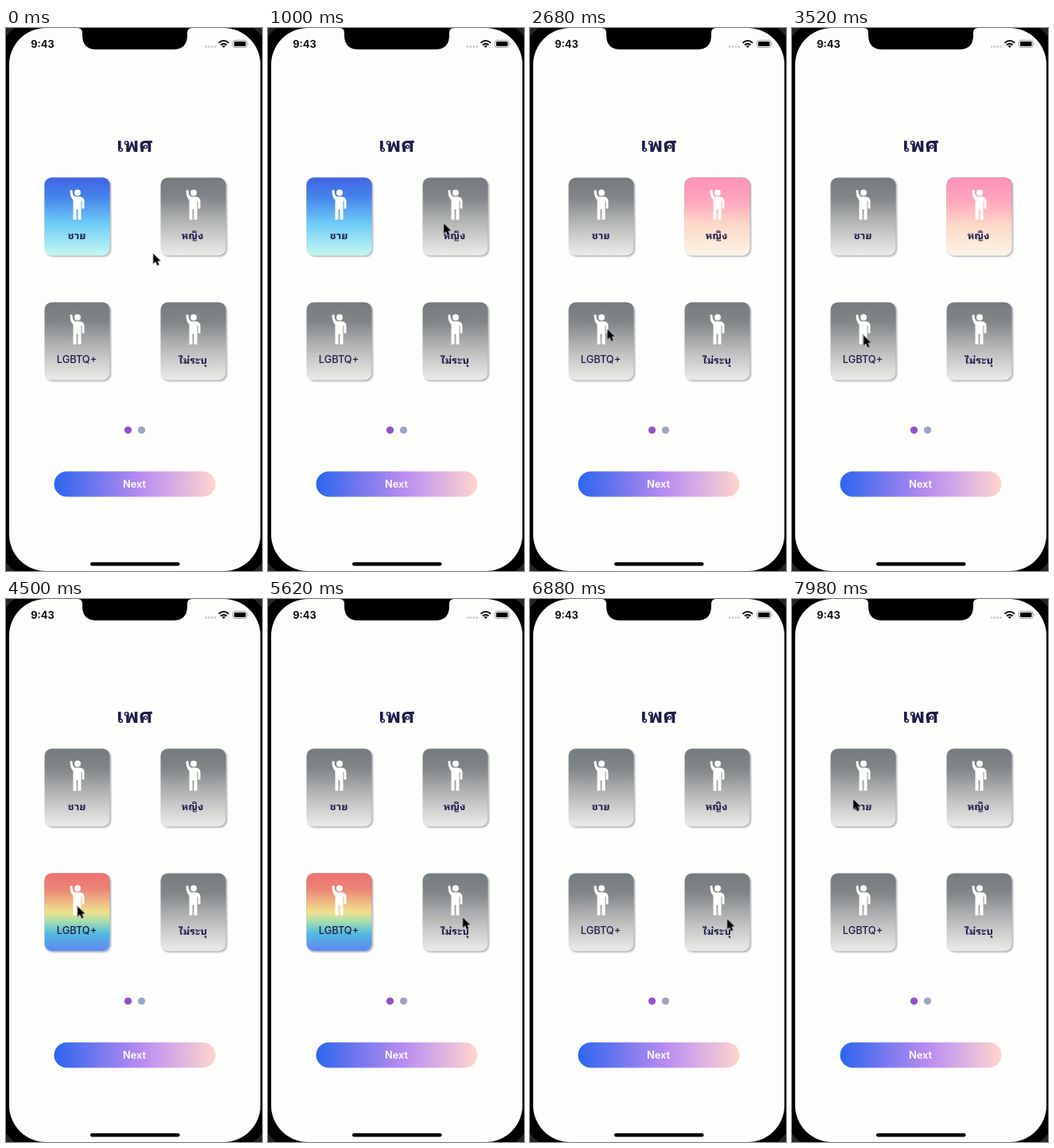
These frames come from a looping animation (322 px wide and 684 px high, 8 s). An HTML page:

```html
<!DOCTYPE html>
<html lang="th">
<head>
<meta charset="utf-8">
<title>เพศ</title>
<style>
html, body { margin: 0; width: 100%; height: 100%; overflow: hidden; background: #262626; }
svg { display: block; width: 322px; height: 684px; }
text {
  font: 500 12.8px Inter, "Noto Sans Thai Looped", "Noto Looped Thai", "Noto Sans Thai", "Noto Sans", sans-serif;
  fill: #201d4c; text-anchor: middle;
}
.title { font-size: 25px; font-weight: 600; }
.bold { font-weight: 600; }
.clock { font-weight: 700; fill: #111; }
.fill { opacity: 0; animation: 8s step-end infinite; }
.male { animation-name: male; }
.female { animation-name: female; }
.rainbow { animation-name: rainbow; }
.pointer { animation: move 8s ease-in-out infinite; }
@keyframes male { 0% { opacity: 1; } 13% { opacity: 0; } }
@keyframes female { 0% { opacity: 0; } 13% { opacity: 1; } 48% { opacity: 0; } }
@keyframes rainbow { 0% { opacity: 0; } 48% { opacity: 1; } 77% { opacity: 0; } }
@keyframes move {
  0% { transform: translate(185px, 284px); animation-timing-function: ease-out; }
  8%, 26% { transform: translate(221px, 246px); }
  35%, 60% { transform: translate(90px, 387px); }
  68.5%, 71% { transform: translate(245px, 401px); }
  74%, 88% { transform: translate(248px, 403px); }
  97%, 100% { transform: translate(77px, 252px); }
}
</style>
</head>
<body>
<svg viewBox="0 0 322 684">
  <defs>
    <linearGradient id="grey" x2="0" y2="1">
      <stop stop-color="#757b7e"/><stop offset=".25" stop-color="#808588"/>
      <stop offset=".5" stop-color="#a9abac"/><stop offset=".72" stop-color="#c9c9c9"/>
      <stop offset="1" stop-color="#ebebe8"/>
    </linearGradient>
    <linearGradient id="blue" x2="0" y2="1">
      <stop stop-color="#4464e4"/><stop offset=".25" stop-color="#4585ea"/>
      <stop offset=".6" stop-color="#70cdf8"/><stop offset="1" stop-color="#c6f8f0"/>
    </linearGradient>
    <linearGradient id="pink" x2="0" y2="1">
      <stop stop-color="#ff92bb"/><stop offset=".3" stop-color="#ffa6bd"/>
      <stop offset=".6" stop-color="#fdd8c8"/><stop offset="1" stop-color="#fcf5e6"/>
    </linearGradient>
    <linearGradient id="pride" x2="0" y2="1">
      <stop stop-color="#ee7272"/><stop offset=".2" stop-color="#ec8476"/>
      <stop offset=".5" stop-color="#f0e18e"/><stop offset=".62" stop-color="#a5dfae"/>
      <stop offset=".78" stop-color="#52b9e2"/><stop offset="1" stop-color="#6087f0"/>
    </linearGradient>
    <linearGradient id="next">
      <stop stop-color="#2c66ee"/><stop offset=".25" stop-color="#6f76ee"/>
      <stop offset=".53" stop-color="#b68bf0"/><stop offset=".68" stop-color="#cda2ea"/>
      <stop offset="1" stop-color="#ffd5cd"/>
    </linearGradient>
    <filter id="soft"><feGaussianBlur stdDeviation="1"/></filter>
    <rect id="face" width="82" height="98" rx="9"/>
    <g id="base">
      <use href="#face" x="1.5" y="1.5" fill="#a9a9b4" filter="url(#soft)"/>
      <use href="#face" fill="url(#grey)"/>
    </g>
    <g id="person" fill="#fffffb">
      <circle cx="41.5" cy="19" r="4"/>
      <path d="M32 16q2-1 3 0q0 7 4 8h6q5 1 5 6v9h-3v-9l-1-1v24h-4V40h-2v13h-4V28q-4-3-4-12z"/>
    </g>
  </defs>

  <rect width="322" height="684" fill="#262626"/>
  <rect x="-12" y="-12" width="346" height="708" rx="58"/>
  <rect x="4" width="316" height="684" rx="46" fill="#fdfdfb"/>
  <path d="M90 0q6 0 6 6v3q0 18 18 18h96q18 0 18-18V6q0-6 6-6z"/>
  <text class="clock" x="46" y="24.5">9:43</text>
  <path d="M250 23.5h14" stroke="#c8c8c8" stroke-width="2.4" stroke-dasharray="2.4 1.4"/>
  <path d="M267.5 18.7q6.3-5.4 12.600 0M270 21.4q3.8-3 7.6 0" fill="none" stroke="#111" stroke-width="2"/>
  <path d="M271.7 22.8q2.1-1.5 4.2 0l-2.1 2.2z"/>
  <rect x="285.5" y="15.5" width="17.5" height="9" rx="2.5" fill="none" stroke="#9c9c9c"/>
  <rect x="287" y="17" width="14.5" height="6" rx="1.2"/>
  <path d="M304 18.5q1.5 1.5 0 3z" fill="#9c9c9c"/>

  <text class="title" x="162" y="156">เพศ</text>

  <g transform="translate(48.5 188.5)">
    <use href="#base"/><use class="fill male" href="#face" fill="url(#blue)"/>
    <use href="#person"/><text class="bold" x="40.5" y="77">ชาย</text>
  </g>
  <g transform="translate(194.5 188.5)">
    <use href="#base"/><use class="fill female" href="#face" fill="url(#pink)"/>
    <use href="#person"/><text class="bold" x="40" y="77">หญิง</text>
  </g>
  <g transform="translate(48.5 345.5)">
    <use href="#base"/><use class="fill rainbow" href="#face" fill="url(#pride)"/>
    <use href="#person"/><text x="40.5" y="76.5">LGBTQ+</text>
  </g>
  <g transform="translate(194.5 345.5)">
    <use href="#base"/><use href="#person"/><text class="bold" x="40.5" y="77">ไม่ระบุ</text>
  </g>

  <circle cx="153.5" cy="506.5" r="4.6" fill="#9152ca"/>
  <circle cx="170.5" cy="506.5" r="4.6" fill="#9ca6c2"/>
  <rect x="60.5" y="558.5" width="203" height="32" rx="16" fill="url(#next)"/>
  <text class="bold" x="161.5" y="579" style="fill:#fff">Next</text>
  <rect x="106" y="673" width="112.5" height="4.5" rx="2.25"/>

  <g class="pointer">
    <path transform="scale(.85)" d="M0 0V15.5L3.6 12.2L6 18L8.8 16.800L6.4 11.2H11.2Z" stroke="#fff" paint-order="stroke"/>
  </g>
</svg>
</body>
</html>
```
